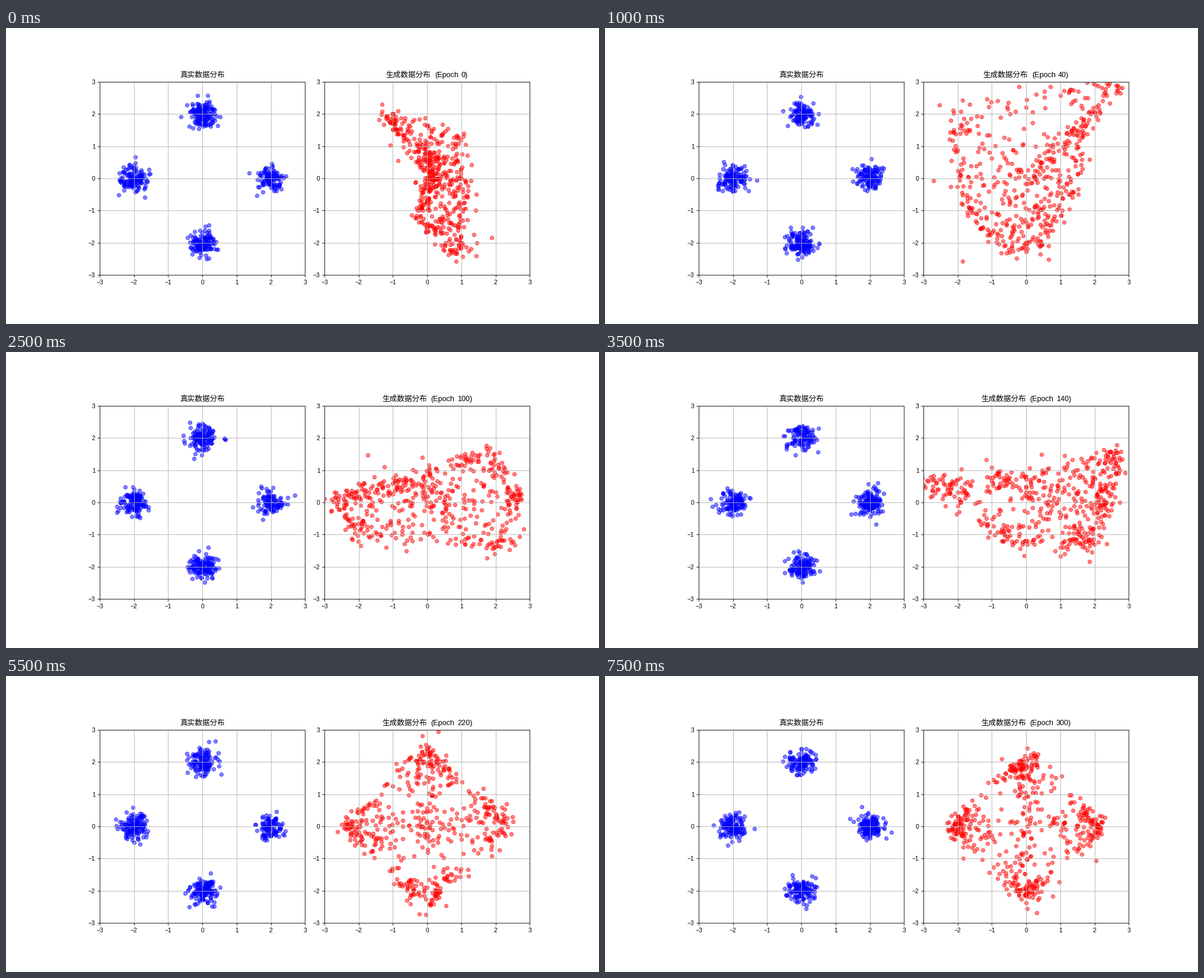
A matplotlib script for the animation above (8 s loop, 1000 by 500 pixels).

```python
import numpy as np
import matplotlib.pyplot as plt
from matplotlib.animation import FuncAnimation

W, H, DPI = 1000, 500, 100
FRAMES, INTERVAL = 16, 500
EPOCH_STEP = 20
N = 512
SCALE = 0.76            # line and marker sizes relative to the usual defaults
HALF_EM = 6.33          # title grid in pixels
TITLE_Y = 82.6

plt.rcParams.update({
    "font.family": ["Liberation Sans", "Noto Sans CJK JP"],
    "font.size": 7.4,
    "axes.linewidth": 0.8 * SCALE,
    "grid.linewidth": 0.8 * SCALE,
})
for axis in ("xtick", "ytick"):
    plt.rcParams.update({
        f"{axis}.major.size": 3.5 * SCALE,
        f"{axis}.major.width": 0.8 * SCALE,
        f"{axis}.major.pad": 3.5 * SCALE,
    })


def ring(radius):
    """Four corners on the axes, counter-clockwise from the right."""
    angle = np.arange(4) * np.pi / 2
    return radius * np.column_stack([np.cos(angle), np.sin(angle)])


# Corners of the cloud's outline, counter-clockwise from the right.
SLANT = [(1.1, -.2), (.8, 1.3), (-1.4, 2.1), (.2, .7), (-.3, -1.2), (1, -2.6)]
CUP = [(1.4, -.4), (1.6, 1.6), (2.7, 2.9), (-2.2, 2.2), (-1.9, -.5),
       (-.9, -2.1), (.4, -2.1)]
BOWTIE = [(2.8, .1), (1.4, 1.7), (-1, .6), (-2.6, -.1), (-2.8, -.9),
          (2.2, -1.3)]
BOAT = [(2.4, .1), (2.7, 1.5), (-.5, .7), (-2.9, .7), (-.6, -1.2),
        (1.8, -1.35)]
KITE = [(2, .7), (1.6, 2.3), (-1.8, .9), (-2.6, -.1), (.2, -2.2), (1.2, -1.7)]
SHAPES = [SLANT, CUP, BOWTIE, BOAT, KITE, ring(2.4), ring(2.2)]
TIMES = [0, 2, 4, 7, 9, 11, 15]


def cloud(shape, u, depth, focus):
    """Points on a closed outline, pulled inwards by depth.

    A higher focus gathers them at the corners.
    """
    corners = np.array(shape, float)
    side, t = np.divmod(u * len(corners), 1)
    side = side.astype(int)
    s = 2 * t - 1
    t = 0.5 + 0.5 * np.sign(s) * np.abs(s) ** (1 / focus)
    start = corners[side]
    end = corners[(side + 1) % len(corners)]
    edge = start + (end - start) * t[:, None]
    return edge + (corners.mean(axis=0) - edge) * depth[:, None]


def generated(i):
    rng = np.random.default_rng(100 + i)
    progress = i / (FRAMES - 1)
    u = rng.random(N)
    depth = 0.95 * rng.random(N) ** (3 + 2 * progress)
    focus = 1.2 + 1.3 * progress ** 2
    at = np.interp(i, TIMES, range(len(SHAPES)))
    k = min(int(at), len(SHAPES) - 2)
    a, b = (cloud(s, u, depth, focus) for s in SHAPES[k:k + 2])
    return a + (b - a) * (at - k) + 0.11 * rng.standard_t(3, (N, 2))


def real(i):
    rng = np.random.default_rng(500 + i)
    return ring(2)[rng.integers(0, 4, N)] + rng.normal(0, 0.2, (N, 2))


fig = plt.figure(figsize=(W / DPI, H / DPI), dpi=DPI, facecolor="white")


def panel(left, right, color, top=90.7, bottom=417.2):
    ax = fig.add_axes([left / W, 1 - bottom / H,
                       (right - left) / W, (bottom - top) / H])
    ax.set(xlim=(-3, 3), ylim=(-3, 3),
           xticks=range(-3, 4), yticks=range(-3, 4))
    ax.grid(True)
    return ax.scatter([], [], s=36 * SCALE ** 2, c=color, alpha=0.5,
                      linewidths=SCALE)


def word(text=""):
    return fig.text(0, 1 - TITLE_Y / H, text, fontsize=9.1,
                    ha="left", va="baseline")


def cells(text):
    return sum(2 if ord(c) > 255 else 1 for c in text)


def lay_out(words, centre):
    """Place words on a half-em grid, one cell apart, centred."""
    total = sum(cells(w.get_text()) for w in words) + len(words) - 1
    x = centre - total * HALF_EM / 2
    for w in words:
        w.set_x(x / W)
        x += (cells(w.get_text()) + 1) * HALF_EM


blue = panel(158, 504.3, "blue")
red = panel(536.9, 883.3, "red")
lay_out([word("真实数据分布")], 331.5)
heading = [word("生成数据分布"), word("(Epoch"), word()]


def update(i):
    blue.set_offsets(real(i))
    red.set_offsets(generated(i))
    heading[2].set_text(f"{i * EPOCH_STEP})")
    lay_out(heading, 710.3)
    return [blue, red, *heading]


anim = FuncAnimation(fig, update, frames=FRAMES, interval=INTERVAL,
                     repeat=True, repeat_delay=0, blit=False)
plt.show()
```
